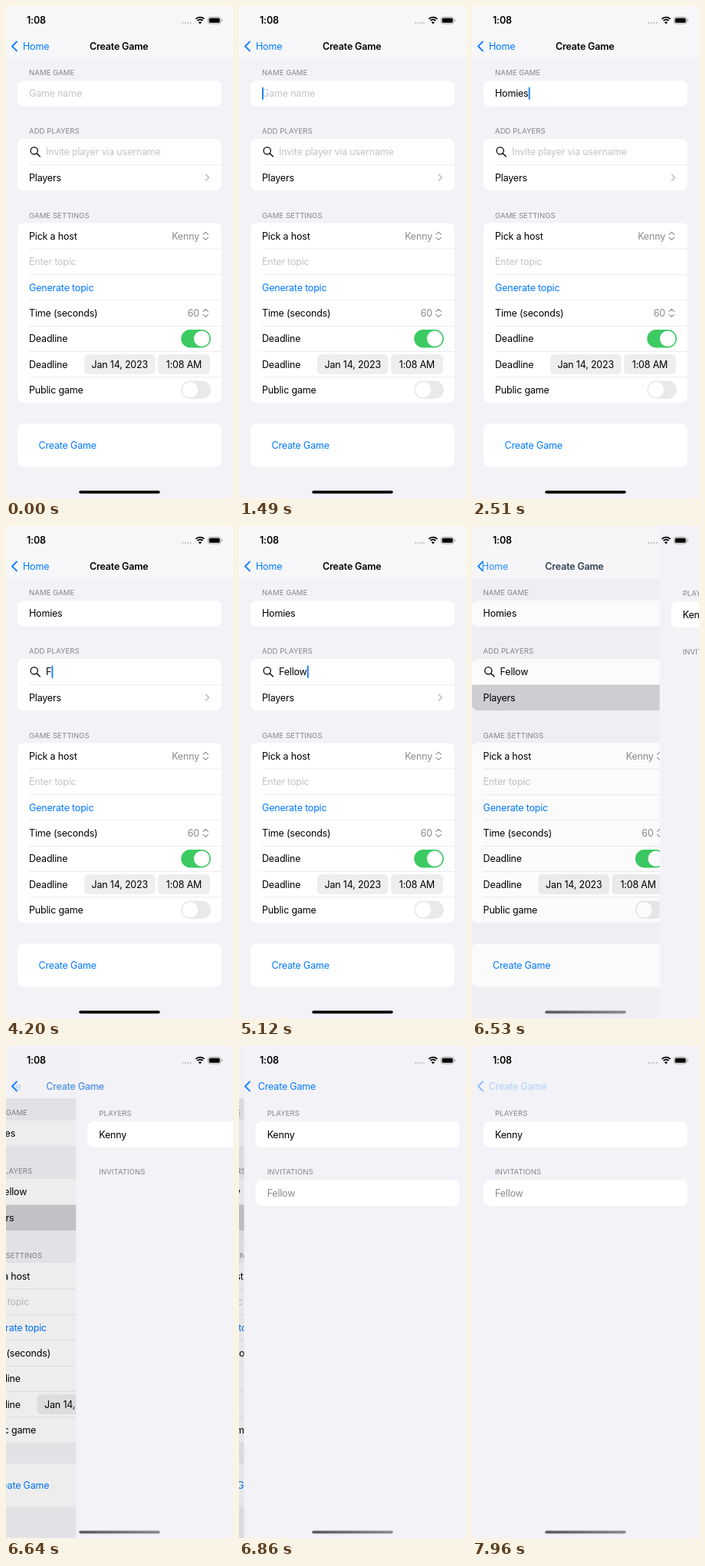
Animation of 296x640 px, one loop 8 s. Source, as an HTML page:

```html
<!DOCTYPE html>
<html lang="en">
<head>
<meta charset="utf-8">
<title>Create Game</title>
<style>
  html, body { margin: 0; width: 100%; height: 100%; overflow: hidden; background: #f2f2f7; }
  svg { display: block; width: 296px; height: 640px; }
  text { font: 12.5px Inter, "Noto Sans", sans-serif; letter-spacing: -.19px; fill: #000; }
  .head { font-size: 9.6px; letter-spacing: .04px; fill: #86868b; }
  .hint { fill: #c4c4c7; }
  .grey { fill: #8a8a8e; }
  .blue { fill: #007aff; }
  .bold { font-weight: 600; }
  .mid { text-anchor: middle; }
  .end { text-anchor: end; }
  .line { fill: none; stroke-linecap: round; stroke-linejoin: round; }
</style>
</head>
<body>
<svg id="stage" viewBox="0 0 296 640"></svg>
<script>
const LOOP = 8000;
const HOST = 'Kenny', GUEST = 'Fellow', TEAM = 'Homies';

const rect = (x, y, w, h, r, fill, more = '') =>
  `<rect x="${x}" y="${y}" width="${w}" height="${h}" rx="${r}" fill="${fill}" ${more}/>`;
const text = (x, y, str, cls = '', id = '') =>
  `<text x="${x}" y="${y}" class="${cls}" id="${id}">${str}</text>`;
const line = (d, color, w, more = '') =>
  `<path class="line" d="${d}" stroke="${color}" stroke-width="${w}" ${more}/>`;
const card = (y, h) => rect(15, y, 266, h, 8, '#fff');
const rule = y => rect(30, y, 251, .7, 0, '#e4e4e7');
const updown = y => line(`M257 ${y - 2}l3.3 -3 3.3 3M257 ${y + 2}l3.3 3 3.3 -3`, '#8a8a8e', 1.1);
const toggle = (y, on) =>
  rect(228.3, y - 11.75, 38.7, 23.5, 11.75, on ? '#3cca63' : '#e9e9eb') +
  `<circle cx="${on ? 255.2 : 240.1}" cy="${y}" r="10.2" fill="#fff"/>`;
const pill = (x, w, str) =>
  rect(x, 453, w, 26, 5, '#eeeeef') + text(x + w / 2, 470.5, str, 'mid');
const caret = id => rect(30, 105.5, 1.8, 16.5, .9, '#0a7cff', `id="${id}"`);

const settings = [315.5, 349, 382.5, 416, 449, 482.5].map(rule).join('');

const form = `<g id="form">
  ${rect(0, 0, 296, 640, 0, '#f2f2f7')}
  ${text(30, 90, 'NAME GAME', 'head')}
  ${card(97, 33.5)}
  ${text(30, 118.2, '', '', 'name')}${caret('nameCaret')}
  ${text(30, 166, 'ADD PLAYERS', 'head')}
  ${card(173, 67)}
  <path id="press" d="M15 206.5h266v25.5a8 8 0 0 1 -8 8h-250a8 8 0 0 1 -8 -8z" fill="#d1d1d5"/>
  ${rule(206)}
  <circle cx="36.7" cy="188.3" r="4.6" class="line" stroke="#000" stroke-width="1.3"/>
  ${line('M40.2 191.8L44.3 195.8', '#000', 1.4)}
  ${text(52, 194.3, '', '', 'search')}${caret('searchCaret')}
  ${text(30, 227.8, 'Players')}
  ${line('M260.5 219.2l4 4 -4 4', '#bcbcc0', 1.5)}
  ${text(30, 275.5, 'GAME SETTINGS', 'head')}
  ${card(282, 234)}${settings}
  ${text(30, 303.6, 'Pick a host')}${text(252, 303.6, HOST, 'grey end')}${updown(299.2)}
  ${text(30, 337, 'Enter topic', 'hint')}
  ${text(30, 370.5, 'Generate topic', 'blue')}
  ${text(30, 403.8, 'Time (seconds)')}${text(252, 403.8, '60', 'grey end')}${updown(399.3)}
  ${text(30, 437, 'Deadline')}${toggle(432.8, true)}
  ${text(30, 470.5, 'Deadline')}
  ${pill(102, 92.5, 'Jan 14, 2023')}${pill(198, 68, '1:08 AM')}
  ${text(30, 503.8, 'Public game')}${toggle(499.3, false)}
  ${card(543, 56.5)}
  ${text(42.5, 575.5, 'Create Game', 'blue')}
</g>`;

// The dimming of the lower page shines through its translucent bar.
const veil = rect(0, 0, 296, 640, 0, '#000', 'id="dim"') +
  rect(0, 0, 296, 68, 0, '#f8f8fb', 'opacity=".75"');

const roster = `<g id="roster">
  ${rect(0, 0, 296, 640, 0, '#f2f2f7')}
  ${text(30, 91.4, 'PLAYERS', 'head')}
  ${card(98, 34)}${text(30, 119.7, HOST)}
  ${text(30, 167.4, 'INVITATIONS', 'head')}
  <g id="invite">${card(174.3, 33.7)}${text(30, 195.9, GUEST, 'grey')}</g>
</g>`;

const arc = r => {
  const d = r * .72;
  return `M${253 - d} ${22.4 - d}A${r} ${r} 0 0 1 ${253 + d} ${22.4 - d}`;
};
const bars = `
  ${text(27, 23.3, '1:08', 'bold')}
  ${[230.3, 233.8, 237.3, 240.8].map(x => `<circle cx="${x}" cy="22" r="1" fill="#b8b8bc"/>`).join('')}
  ${line(arc(7.6) + arc(4.7), '#000', 1.8, 'style="stroke-linecap:butt"')}
  <path d="M253 23.4l-2 -2.1a2.8 2.8 0 0 1 4 0z"/>
  ${rect(263.5, 14.5, 16.5, 8.6, 2.6, 'none', 'stroke="#a0a0a4" stroke-width=".9"')}
  ${rect(264.8, 15.8, 13.9, 6, 1.5, '#000')}
  ${rect(281, 17.3, 1.1, 3, .5, '#a0a0a4')}
  ${line('M14 46.3L8 52.3L14 58.3', '#007aff', 1.9, 'id="back"')}
  <clipPath id="edge"><rect x="11" y="40" width="90" height="26"/></clipPath>
  <g clip-path="url(#edge)">${text(22, 57, 'Home', 'blue', 'home')}</g>
  ${text(109, 56.8, 'Create Game', 'bold', 'title')}
  ${text(22, 57, 'Create Game', 'blue', 'backLabel')}
  <linearGradient id="sheen">
    <stop stop-color="#5c5c5e"/><stop offset="1" stop-color="#8c8c8f"/>
  </linearGradient>
  ${rect(95.3, 630.4, 105.4, 3.8, 1.9, '#000', 'id="grip"')}`;

const stage = document.getElementById('stage');
stage.innerHTML = form + veil + roster + bars;
const el = {};
stage.querySelectorAll('[id]').forEach(e => { if (e.id) el[e.id] = e; });

// Value of the last [time, value] pair reached.
const at = (t, keys) => keys.reduce((v, [k, next]) => t >= k ? next : v, keys[0][1]);
const count = (t, times) => times.filter(k => t >= k).length;
const fade = (e, v) => e.setAttribute('opacity', v);
const move = (e, x, y = 0) => e.setAttribute('transform', `translate(${x} ${y})`);

const NAME_KEYS = [1600, 1810, 1970, 2120, 2360, 2510];
const SEARCH_KEYS = [4200, 4400, 4680, 4790, 5010, 5120];
const NAME_BLINK = [[0, 0], [500, 1], [1200, 0], [1490, 1], [3030, .6], [3140, .25], [3260, 0],
  [3430, .5], [3550, 1], [3850, 0]];
const SEARCH_BLINK = [[0, 0], [3850, 1], [5330, .4], [5440, 0]];
const GRIP = [[0, '#000'], [5330, '#2a2a2b'], [5440, '#444446'], [5840, 'url(#sheen)']];

function field(node, cursor, typed, hint, blink, x, y) {
  node.textContent = typed || hint;
  node.setAttribute('class', typed ? '' : 'hint');
  move(cursor, x - 30 + (typed ? node.getComputedTextLength() + .3 : 0), y);
  fade(cursor, blink);
}

// Share of the push still to go: a critically damped spring, sampled every 110 ms.
function remaining(t) {
  if (t < 6530) return 1;
  if (t >= 6970) return 0;
  const u = (Math.floor((t - 6530) / 110) * 110 + 50) * .015;
  return (1 + u) * Math.exp(-u);
}

function draw(t) {
  field(el.name, el.nameCaret, TEAM.slice(0, count(t, NAME_KEYS)), 'Game name', at(t, NAME_BLINK), 30, 0);
  field(el.search, el.searchCaret, GUEST.slice(0, count(t, SEARCH_KEYS)),
    'Invite player via username', at(t, SEARCH_BLINK), 52, 76);

  const rem = remaining(t), p = 1 - rem, slide = 87 * rem ** .9;
  const pressed = t >= 7960;
  move(el.form, -88.8 * p);
  move(el.roster, 296 * rem);
  fade(el.dim, .1 * p);
  fade(el.press, t >= 6530 ? 1 : 0);
  fade(el.invite, t >= 6860 ? 1 : 0);

  move(el.home, -53 * p);
  fade(el.home, rem);
  move(el.title, slide - 87);
  fade(el.title, rem ** 1.6);
  move(el.backLabel, slide);
  fade(el.backLabel, pressed ? .28 : p);
  fade(el.back, pressed ? .45 : 1);
  el.grip.setAttribute('fill', at(t, GRIP));
}

function tick() {
  draw(performance.now() % LOOP);
  requestAnimationFrame(tick);
}
tick();
</script>
</body>
</html>
```
